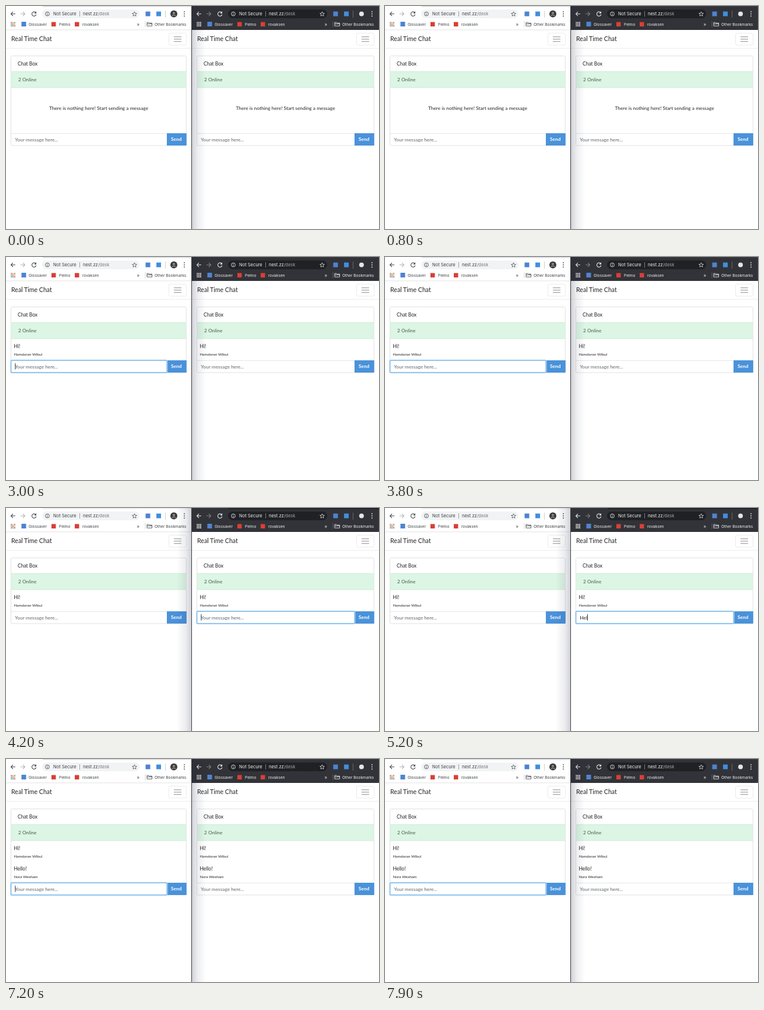
Write an HTML page that moves like this. It is 640 px wide and 382 px high and loops after 8 s.

```html
<!DOCTYPE html>
<html lang="en">
<head>
<meta charset="utf-8">
<title>Real Time Chat</title>
<style>
  html, body { margin: 0; width: 100%; height: 100%; overflow: hidden; background: #fff; }
  svg { display: block; }
  svg svg { overflow: visible; }
  text { font-family: Lato, sans-serif; white-space: pre; }
  .ui { font-family: Inter, sans-serif; }
</style>
</head>
<body>
<svg id="stage" width="640" height="382" viewBox="0 0 640 382"></svg>
<script>
const LOOP = 8000, BLINK = 500;
const CLICK_LEFT = 1600, SEND_HI = 2900, CLICK_RIGHT = 3900, SEND_HELLO = 6500, BACK_LEFT = 7200;

// [time, text] per window: what the input holds from that time on
const typing = [
  [[1900, 'H'], [2300, 'Hi'], [2600, 'Hi!'], [SEND_HI, '']],
  [[4800, 'H'], [5000, 'He'], [5200, 'Hel'], [5300, 'Hell'], [5500, 'Hello'], [5800, 'Hello!'], [SEND_HELLO, '']]
];
const messages = [
  { at: SEND_HI, text: 'Hi!', author: 'Hamdoran Wibul' },
  { at: SEND_HELLO, text: 'Hello!', author: 'Nora Wexham' }
];
const themes = [
  { bar: '#fff', pill: '#f1f3f4', ink: '#4a4d51', text: '#3c4043', soft: '#777b80', off: '#b4b6b9',
    strip: ['#e8eaed', '#d8dbe0'], apps: ['#ea4335', '#f2a33a', '#34a853', '#4285f4'], mail: '#d93f35' },
  { bar: '#323338', pill: '#202124', ink: '#e4e5e7', text: '#f1f1f2', soft: '#a4a6aa', off: '#7b7d82',
    strip: ['#3a3b3f', '#1d1e21'], apps: ['#f1f1f2'], mail: '#d93f35' }
];

const rect = (x, y, w, h, fill, more = '') =>
  `<rect x="${x}" y="${y}" width="${w}" height="${h}" fill="${fill}" ${more}/>`;
const dot = (x, y, r, fill, more = '') => `<circle cx="${x}" cy="${y}" r="${r}" fill="${fill}" ${more}/>`;
const line = (d, color, width = 1) =>
  `<path d="${d}" fill="none" stroke="${color}" stroke-width="${width}"/>`;
const text = (x, y, size, fill, str, more = '') =>
  `<text x="${x}" y="${y}" font-size="${size}" fill="${fill}" ${more}>${str}</text>`;
const ui = (x, y, size, fill, str) => text(x, y, size, fill, str, 'class="ui"');
const shifted = (x, content) => `<svg x="${x}">${content}</svg>`;

const pen = document.createElement('canvas').getContext('2d');
function textWidth(str, size) {
  pen.font = '100px Lato, sans-serif';
  return pen.measureText(str).width * size / 100;
}

// d is the extra width of the window, which shifts right-aligned parts
function toolbar(dark, d, active) {
  const c = themes[+dark];
  let s = rect(0, 0, 318 + d, 41, c.bar) + rect(63, 0, 255 + d, 1.5, c.strip[+active]);
  s += line('M16 13.5H8.5M12 10l-3.5 3.5 3.5 3.5', c.ink, 1.1);
  s += line('M25 13.5h7.5M29 10l3.5 3.5-3.5 3.5', c.off, 1.1);
  s += line('M51 11.3a3.7 3.7 0 1 0 .7 3.2', c.ink, 1.1) + `<path d="M52 9v3.7h-3.7z" fill="${c.ink}"/>`;
  s += rect(62, 6, 167 + d, 15, c.pill, 'rx="7.5"');
  s += dot(71, 13.5, 3.4, 'none', `stroke="${c.ink}" stroke-width=".9"`) + line('M71 11.4v.9M71 13v2.5', c.ink, .9);
  s += ui(81, 16.3, 7.5, c.text, 'Not Secure') + rect(126, 9, .7, 9, c.soft);
  s += ui(132, 16.3, 7.5, c.text, `nest.zz<tspan fill="${c.soft}">/desk</tspan>`);

  let right = line('M220.5 9.8l1.1 2.6 2.8.2-2.1 1.8.7 2.8-2.5-1.5-2.5 1.5.7-2.8-2.1-1.8 2.8-.2z', c.ink, .8);
  right += rect(239.5, 9.5, 8, 8, '#4f83d1') + rect(258, 9.5, 8, 8, '#3f8fe0');
  right += rect(273, 8, .7, 12, c.off);
  right += dark ? dot(288, 13.5, 4, '#e4e5e7')
    : dot(288, 13.5, 6, '#3b3b3b') + dot(288, 12, 2.1, '#8b8b8b') + line('M284.7 17q3.3-3.6 6.6 0', '#8b8b8b', 1.5);
  right += [9.8, 13.5, 17.2].map(y => dot(306, y, .95, c.ink)).join('');
  right += ui(224.5, 33.6, 8, c.ink, '»') + rect(238.7, 26, .6, 10, c.off);
  right += line('M242 28.2h3l1 1h4.5v5H242zM242 30.6h8.5', c.ink, .9);
  right += ui(255, 33.6, 6.6, c.text, 'Other Bookmarks');
  s += shifted(d, right);

  for (let i = 0; i < 9; i++)
    s += rect(8.4 + i % 3 * 2.8, 27.4 + (i / 3 | 0) * 2.8, 1.9, 1.9, c.apps[i % c.apps.length]);
  s += rect(26.5, 27, 8, 8, '#4f83d1') + rect(78, 27.5, 7.5, 7.5, c.mail) + rect(118, 27.5, 7.5, 7.5, c.mail);
  s += ui(39, 33.6, 6.6, c.text, 'Glossaver') + ui(91, 33.6, 6.6, c.text, 'Pelmo') + ui(131, 33.6, 6.6, c.text, 'rovaksen');
  return s + (dark ? '' : rect(0, 40.5, 318, .8, '#dcdcdc'));
}

function page(d, t, side, active) {
  const shown = messages.filter(m => t >= m.at);
  const typed = typing[side].filter(k => t >= k[0]).pop() || [0, ''];
  const value = typed[1];
  const top = shown.length ? 142 + 35 * shown.length : 218;
  const edge = 309.3 + d, button = 276 + d;

  let s = text(9, 60, 10.6, '#222', 'Real Time Chat') + rect(0, 72, 318 + d, .8, '#e9e9e9');
  s += rect(279.5 + d, 46.5, 30, 20.5, '#fff', 'rx="2.5" stroke="#e6e6e6" stroke-width=".8"');
  s += line([52.8, 56.8, 60.8].map(y => `M${288 + d} ${y}h13`).join(''), '#7d7d7d', .9);

  s += rect(8.5, 85.5, edge - 8.5, top - 64.5, '#fff', 'rx="2" stroke="#dedede" stroke-width=".9"');
  s += text(20, 102, 8.5, '#222', 'Chat Box');
  s += rect(8.5, 112, edge - 8.5, 28, '#dcf5e4') + line(`M8.5 112.2H${edge}M8.5 139.8H${edge}`, '#c8ebd5', .8);
  s += text(21, 129, 8.4, '#3f5f4d', '2 Online');

  if (!shown.length)
    s += text(159 + d / 2, 178.2, 8.4, '#222', 'There is nothing here! Start sending a message', 'text-anchor="middle"');
  shown.forEach((m, i) => {
    s += text(13.5, 155.8 + 35 * i, 8.5, '#222', m.text) + text(13.5, 168.6 + 35 * i, 6.5, '#222', m.author);
  });

  s += line(`M8.5 ${top + .4}H${edge}`, '#dfdfdf', .8);
  s += rect(button, top, edge + .5 - button, 21, '#4a92da');
  s += text(283 + d, top + 13.2, 8.3, '#fff', 'Send', 'font-weight="700"');
  if (active.focus) {
    s += rect(8.8, top + .2, button - 8.8, 20.6, '#fff', 'stroke="#b5d7f3" stroke-width="3" rx="1.5"');
    s += rect(8.8, top + .2, button - 8.8, 20.6, '#fff', 'stroke="#6bb0e8" stroke-width="1.1" rx="1"');
  }
  s += text(15.3, top + 13.5, 8.3, value ? '#222' : '#5f666c', value || 'Your message here...');
  const since = t - Math.max(active.since, typed[0]);
  if (active.focus && since % (2 * BLINK) < BLINK)
    s += rect(15.5 + textWidth(value, 8.3), top + 4.8, .9, 11, '#222');
  return s;
}

function scene(t) {
  const rightOnTop = t >= CLICK_RIGHT && t < BACK_LEFT;
  const left = { focus: t >= CLICK_LEFT && !rightOnTop, since: t >= BACK_LEFT ? BACK_LEFT : CLICK_LEFT };
  const right = { focus: rightOnTop, since: CLICK_RIGHT };
  const [from, to, x] = rightOnTop ? [1, 0, 293] : [0, 1, 319];
  return `<linearGradient id="shade" x1="${from}" x2="${to}">
      <stop stop-color="#1a2040" stop-opacity=".2"/><stop offset=".4" stop-color="#1a2040" stop-opacity=".08"/>
      <stop offset="1" stop-color="#1a2040" stop-opacity="0"/></linearGradient>
    ${rect(0, 0, 640, 382, '#fff')}
    ${toolbar(false, 0, !rightOnTop)}${page(0, t, 0, left)}
    ${shifted(319, toolbar(true, 3, rightOnTop) + page(3, t, 1, right))}
    ${rect(x, 0, rightOnTop ? 25 : 24, 382, 'url(#shade)')}
    ${rect(318, 0, 1, 382, '#3a3a3d')}`;
}

const stage = document.getElementById('stage');
let last = '';
function tick() {
  const markup = scene(performance.now() % LOOP);
  if (markup !== last) stage.innerHTML = last = markup;
  requestAnimationFrame(tick);
}
tick();
</script>
</body>
</html>
```
